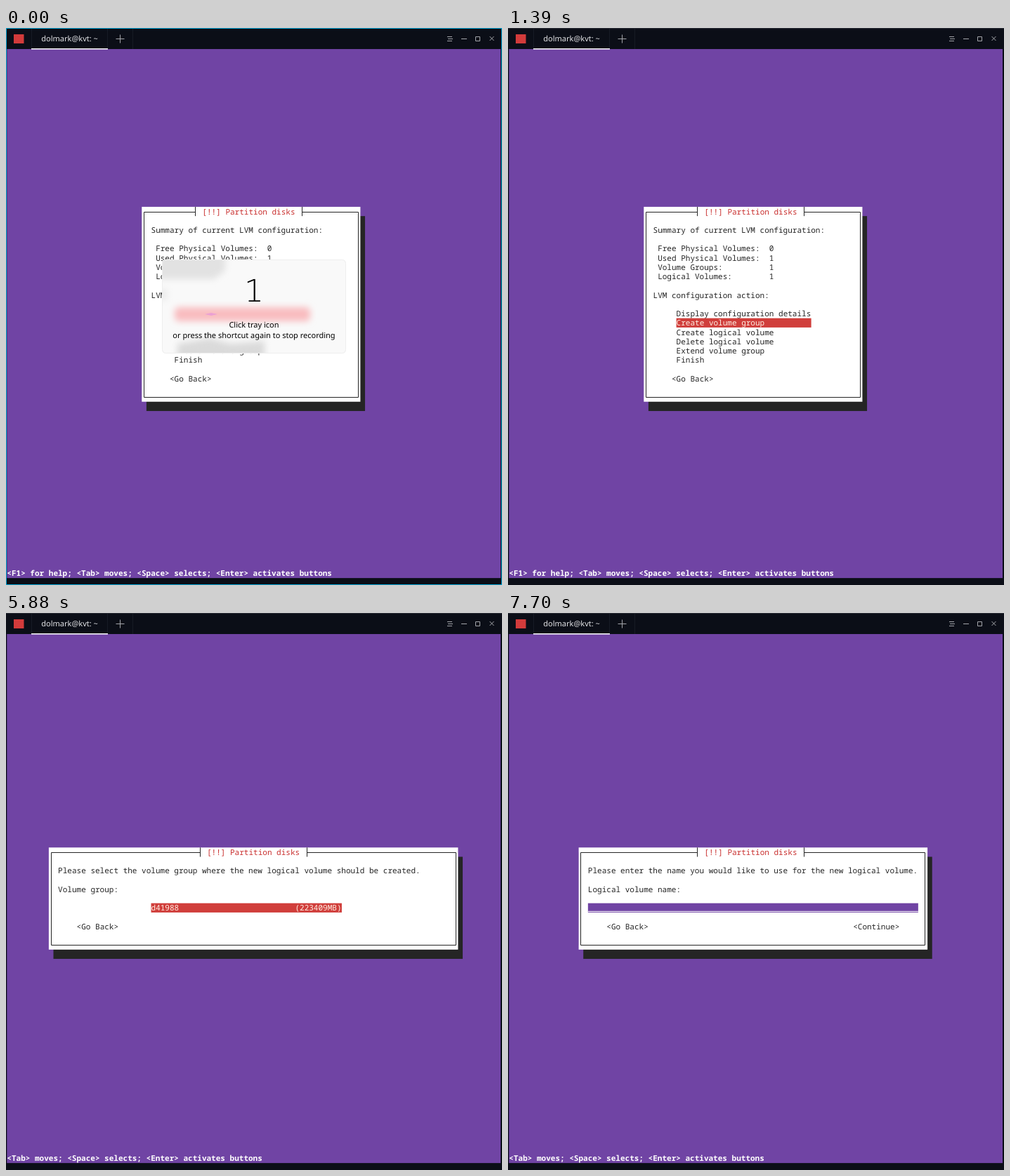
An HTML page that plays this animation: 706 by 794 pixels, repeating every 8000 ms.

```html
<!DOCTYPE html>
<html lang="en">
<head>
<meta charset="utf-8">
<title>Partition disks</title>
<style>
html, body { margin: 0; width: 100%; height: 100%; overflow: hidden; background: #0b0e17; }
svg { display: block; }
text { white-space: pre; text-rendering: geometricPrecision; font: 11px "Noto Sans", sans-serif; }
.mono { font: 11.033px "Noto Sans Mono", monospace; fill: #252525; }
.title { fill: #c9302f; }
.picked { fill: #fff0e4; }
.help { fill: #fff; font-weight: 700; }
.line { fill: none; stroke: #252525; }
.icon { fill: none; stroke: #a4a6ab; }
</style>
</head>
<body>
<svg id="stage" width="706" height="794" viewBox="0 0 706 794"></svg>
<script>
const CELL_W = 6.62, CELL_H = 13.23;
const PURPLE = '#7044a4', RED = '#d03e3b';
const px = col => 1.3 + col * CELL_W;
const py = row => 30 + row * CELL_H;
const snap = v => Math.floor(v) + 0.5;

const text = (col, row, str, cls = '') =>
  `<text class="mono ${cls}" x="${px(col)}" y="${py(row) + 10.6}">${str.replace(/</g, '&lt;')}</text>`;

const block = (col, row, cols, rows, fill) =>
  `<rect x="${px(col)}" y="${py(row)}" width="${cols * CELL_W}" height="${rows * CELL_H}" fill="${fill}"/>`;

const group = (id, body) => `<g id="${id}">${body}</g>`;

// A newt style window: shadow, white box, frame broken by the title.
function dialog(col, row, cols, rows, titleCol) {
  const left = snap(px(col + 0.5)), right = snap(px(col + cols - 0.5));
  const top = Math.round(py(row + 0.5)) + 0.5, bottom = snap(py(row + rows - 0.5));
  const gapL = snap(px(titleCol - 1.5)), gapR = snap(px(titleCol + 21.5));
  const y0 = py(row), y1 = py(row + 1);
  return block(col + 1, row + 1, cols, rows, '#252525') +
    block(col, row, cols, rows, '#fff') +
    `<path class="line" d="M${gapL} ${top}H${left}V${bottom}H${right}V${top}H${gapR}
      M${gapL} ${y0}V${y1}M${gapR} ${y0}V${y1}"/>` +
    text(titleCol, row, '[!!] Partition disks', 'title');
}

const helpLine = str => block(0, 56, 106.15, 1, PURPLE) + text(0, 56, str, 'help');
const keys = '<Tab> moves; <Space> selects; <Enter> activates buttons';

const actions = ['Display configuration details', 'Create volume group', 'Create logical volume',
  'Delete logical volume', 'Extend volume group', 'Finish'];

const windowBar = `
  <path d="M0 .5H706" stroke="#2b2e36"/>
  <path d="M36.5 1V30M144.5 1V30M180.5 1V30" stroke="#171b25"/>
  <rect x="11" y="9" width="14.5" height="13" fill="#d23b3b"/>
  <text x="50.3" y="19" fill="#e2e3e6">dolmark@kvt: ~</text>
  <rect x="36" y="29" width="109" height="1.6" fill="#f4f4f6"/>
  <path class="icon" d="M156.5 15.5H168.5M162.5 9.5V21.5M628 12.5H635M629 15.5H636M628 18.5H635
    M648 15.5H656M668.5 12.5H674.5V18.5H668.5ZM688.5 12L694.5 18M694.5 12L688.5 18"/>`;

const menu = dialog(29, 17, 47, 21, 42) +
  text(31, 19, 'Summary of current LVM configuration:') +
  ['Free Physical Volumes:  0', 'Used Physical Volumes:  1', 'Volume Groups:          1', 'Logical Volumes:        1']
    .map((s, i) => text(32, 21 + i, s)).join('') +
  text(31, 26, 'LVM configuration action:') +
  actions.map((s, i) => text(36, 28 + i, s)).join('') +
  actions.slice(0, 3).map((s, i) =>
    group('pick' + i, block(36, 28 + i, 29, 1, RED) + text(36, 28 + i, s, 'picked'))).join('') +
  text(35, 35, '<Go Back>') + helpLine('<F1> for help; ' + keys);

const chooser = dialog(9, 23, 88, 11, 43) +
  text(11, 25, 'Please select the volume group where the new logical volume should be created.') +
  text(11, 27, 'Volume group:') + block(31, 29, 41, 1, RED) +
  text(31, 29, 'd41988' + ' '.repeat(25) + '(223409MB)', 'picked') +
  text(15, 31, '<Go Back>') + helpLine(keys);

const naming = dialog(15, 23, 75, 11, 42) +
  text(17, 25, 'Please enter the name you would like to use for the new logical volume.') +
  text(17, 27, 'Logical volume name:') + block(17, 29, 71, 1, PURPLE) +
  `<path d="M${px(17)} 425.4H${px(88)}" stroke="#fff"/>` +
  group('caret', block(17, 29, 1, 1, '#fffff0')) +
  text(21, 31, '<Go Back>') + text(74, 31, '<Continue>') + helpLine(keys);

const notice = `
  <defs>
    <filter id="blur" x="-30%" y="-80%" width="160%" height="260%"><feGaussianBlur stdDeviation="5"/></filter>
    <clipPath id="card"><rect x="222" y="330" width="262" height="134" rx="5"/></clipPath>
  </defs>
  <g clip-path="url(#card)">
    <rect x="222" y="330" width="262" height="134" fill="#f9f9f9"/>
    <g filter="url(#blur)">
      <path d="M215 322H312V346L296 358H215Z" fill="#e2e2e2"/>
      <path d="M215 372H230V388H215Z" fill="#ececec"/>
      <path d="M244 450L290 442L320 450L368 446V472H244Z" fill="#dadada"/>
      <rect x="240" y="398" width="193" height="20" rx="6" fill="#f9bcbf"/>
    </g>
    <path d="M283 408L292 406L301 408L292 410Z" fill="#eba0d4"/>
  </g>
  <rect x="222.5" y="330.5" width="261" height="133" rx="5" fill="none" stroke="#eee"/>
  <g text-anchor="middle">
    <text x="353" y="390" style="font:200 44px 'DejaVu Sans Light','DejaVu Sans',sans-serif">1</text>
    <text x="353" y="427">Click tray icon</text>
    <text x="353" y="442">or press the shortcut again to stop recording</text>
  </g>
  <rect x=".5" y=".5" width="705" height="793" fill="none" stroke="#05a3d3"/>`;

document.getElementById('stage').innerHTML =
  `<rect width="706" height="794" fill="#0b0e17"/>
   <rect x="1.3" y="30" width="702.7" height="741" fill="${PURPLE}"/>` + windowBar +
  group('prompt', block(0, 56, 1, 1, '#fffff0')) +
  group('menu', menu) + group('chooser', chooser) + group('naming', naming) + group('notice', notice);

// Visible time span of each layer, in ms.
const spans = {
  notice: [0, 50], menu: [0, 5830], pick0: [0, 1390], pick1: [1390, 1950], pick2: [1950, 5830],
  prompt: [5830, 5880], chooser: [5880, 7170], naming: [7170, 8000], caret: [7170, 7700]
};
const layers = Object.entries(spans).map(([id, span]) => [document.getElementById(id), span]);

function draw() {
  const t = performance.now() % 8000;
  for (const [el, [from, to]] of layers) el.style.display = t >= from && t < to ? '' : 'none';
  requestAnimationFrame(draw);
}
draw();
</script>
</body>
</html>
```
